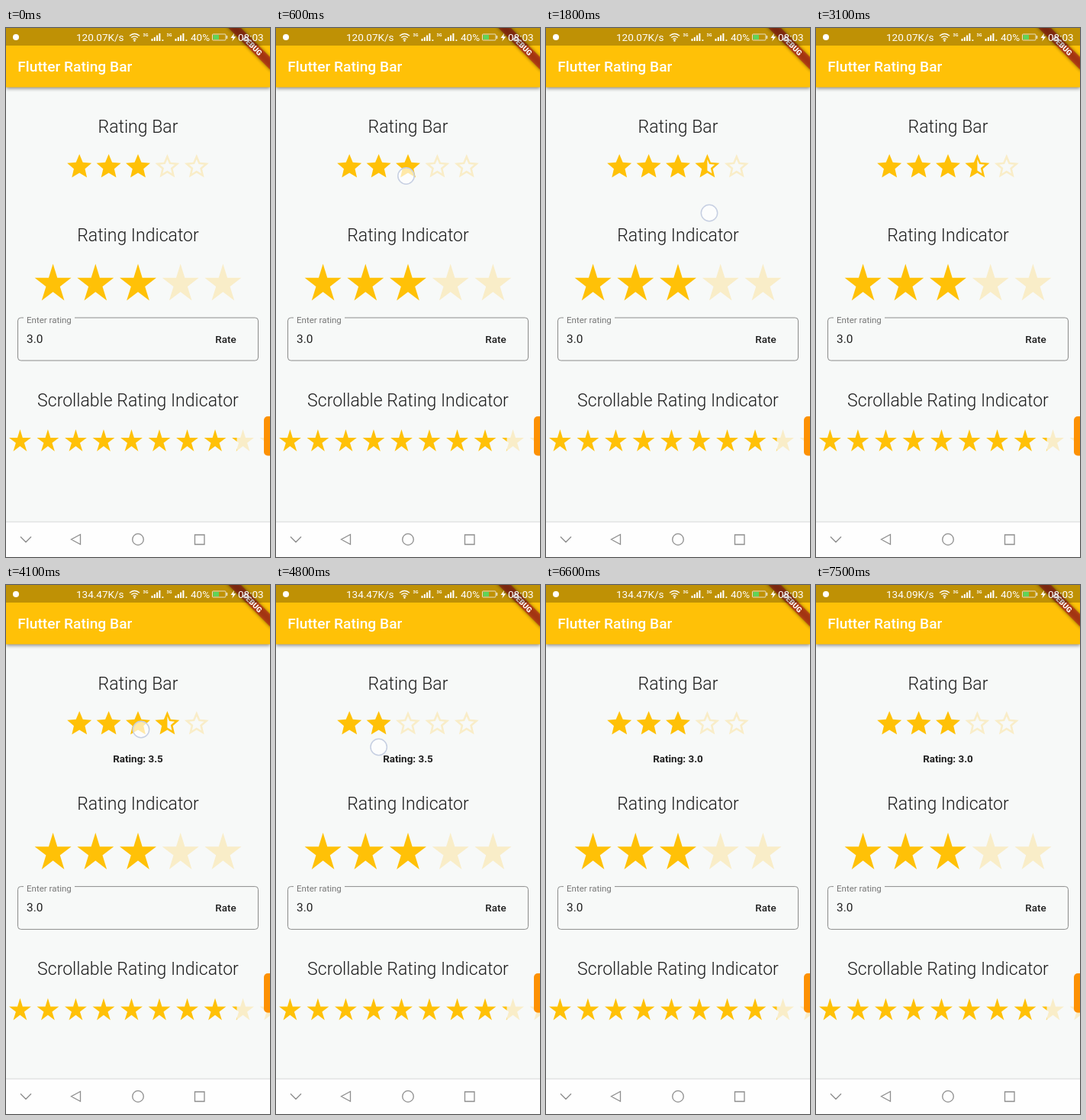
Write an HTML page that moves like this. It is 346 by 692 pixels and loops after 8 s.

```html
<!DOCTYPE html>
<html lang="en">
<head>
<meta charset="utf-8">
<title>Rating bar demo</title>
<style>
  html, body { margin: 0; width: 100%; height: 100%; overflow: hidden; background: #f7f9f8; }
  svg { display: block; width: 100vw; height: 100vh; font-family: Roboto, sans-serif; }
  .heading { font-size: 23.05px; font-weight: 300; text-anchor: middle; fill: #1c1c1c; }
  .status { font-size: 13.5px; fill: #fff; }
  .tiny { font-size: 5.5px; font-weight: 700; fill: #fff; }
  .amber { fill: #ffc107; }
  .pale { fill: #f9edc8; }
  .nav { fill: none; stroke: #8d8d8d; stroke-width: 1.3; }
</style>
</head>
<body>
<svg viewBox="0 0 346 692">
  <defs>
    <path id="full" d="M12 17.27L18.18 21l-1.64-7.03L22 9.24l-7.19-.61L12 2 9.19 8.63 2 9.24l5.46 4.73L5.82 21z"/>
    <path id="empty" fill-rule="evenodd" d="M22 9.24l-7.19-.62L12 2 9.19 8.63 2 9.24l5.46 4.73L5.82 21 12 17.27 18.18 21l-1.63-7.03zM12 15.4l-3.76 2.27 1-4.28-3.32-2.88 4.38-.38L12 6.1l1.71 4.04 4.38.38-3.32 2.88 1 4.28z"/>
    <path id="half" fill-rule="evenodd" d="M22 9.24l-7.19-.62L12 2 9.19 8.63 2 9.24l5.46 4.73L5.82 21 12 17.27 18.18 21l-1.63-7.03zM12 15.4V6.1l1.71 4.04 4.38.38-3.32 2.88 1 4.28z"/>
    <path id="sharp" d="M.5 0L.618 .382H1L.691 .618 .809 1 .5 .764 .191 1 .309 .618 0 .382H.382z"/>
    <clipPath id="fraction"><rect width=".22" height="1"/></clipPath>
    <filter id="shadow" x="-10%" y="-50%" width="120%" height="200%"><feGaussianBlur stdDeviation="2"/></filter>
    <g id="signal">
      <text class="tiny" x="0" y="11">3G</text>
      <path fill="#fff" d="M11 14h2v3h-2zM14.3 12h2v5h-2zM17.6 9.5h2v7.5h-2zM20.9 7h2v10h-2zM25 15.2h1.8V17H25z"/>
    </g>
  </defs>

  <rect width="346" height="692" fill="#f7f9f8"/>

  <text class="heading" x="173" y="136.5">Rating Bar</text>
  <g id="bar"></g>
  <text id="label" x="173" y="231.5" text-anchor="middle" font-size="13.45" font-weight="700" fill="#1f1f1f"></text>

  <g id="lower">
    <text class="heading" x="173" y="278.5">Rating Indicator</text>
    <g id="indicator"></g>
    <path fill="none" stroke="#8c8c8c" d="M23 379H19.5a4 4 0 0 0-4 4v48a4 4 0 0 0 4 4h307a4 4 0 0 0 4-4v-48a4 4 0 0 0-4-4H90"/>
    <text x="27" y="385.5" font-size="11.5" fill="#777">Enter rating</text>
    <text x="27" y="411.5" font-size="15.4" fill="#222">3.0</text>
    <text x="274.3" y="411.7" font-size="13.45" font-weight="500" fill="#1f1f1f">Rate</text>
    <text class="heading" x="173" y="495">Scrollable Rating Indicator</text>
    <g id="scroller"></g>
  </g>

  <rect x="338" y="508" width="16" height="51.5" rx="5" fill="#fd9103"/>

  <rect y="40" width="346" height="39.5" fill="#000" opacity=".4" filter="url(#shadow)"/>
  <rect class="amber" width="346" height="77.5"/>
  <text x="15.3" y="57" font-size="19.2" font-weight="500" fill="#fff">Flutter Rating Bar</text>

  <g transform="translate(346) rotate(45) scale(.961)">
    <rect x="-44" y="28" width="88" height="12" fill="#000" opacity=".5" filter="url(#shadow)"/>
    <rect x="-44" y="28" width="88" height="12" fill="#b71c1c" opacity=".63"/>
    <text y="37.6" text-anchor="middle" font-size="10.2" font-weight="900" fill="#fff">DEBUG</text>
  </g>

  <rect width="346" height="23" opacity=".25"/>
  <circle cx="13" cy="12" r="4" fill="#fff"/>
  <text id="speed" class="status" x="92" y="17"></text>
  <g fill="none" stroke="#fff" stroke-width="1.3">
    <path d="M162 10.2q6.5-5.4 13 0M164.2 12.6q4.3-3.6 8.6 0M166.4 14.8q2.1-1.8 4.2 0"/>
    <circle cx="168.5" cy="16.4" r=".6"/>
  </g>
  <use href="#signal" x="179.5"/>
  <use href="#signal" x="210.5"/>
  <text class="status" x="242" y="17">40%</text>
  <rect x="270.5" y="8" width="17.5" height="8" rx="1" fill="none" stroke="#e8e0c8"/>
  <path fill="#e8e0c8" d="M288.5 10h1.8v4h-1.8z"/>
  <path fill="#5fd35a" d="M271.5 9h7.5v6h-7.5z"/>
  <path fill="#fff" d="M299 7l-4.5 6h3l-1.2 4.5 5-6.2h-3.1z"/>
  <text class="status" x="304" y="17">08:03</text>

  <rect y="646" width="346" height="46" fill="#fefefe"/>
  <path d="M0 646h346" stroke="#d6d8d7"/>
  <path class="nav" d="M19 665.5l7 7 7-7M97.5 662.5v13L85.5 669zM247.5 663h12.500v12.500h-12.500z"/>
  <circle class="nav" cx="173" cy="669" r="7.3"/>

  <circle id="pointer" r="10.7" fill="#fff" fill-opacity=".65" stroke="#c6cfe2" stroke-width="1.5"/>
</svg>
<script>
const $ = id => document.getElementById(id);
const LOOP = 8000, STEP = 100;
const BAR_X = 77, BAR_Y = 161.9, ITEM = 38.4;

function addUse(parent, shape, x, y, scale, className) {
  const use = document.createElementNS('http://www.w3.org/2000/svg', 'use');
  use.setAttribute('href', '#' + shape);
  use.setAttribute('transform', `translate(${x} ${y}) scale(${scale})`);
  use.setAttribute('class', className);
  parent.append(use);
  return use;
}

function sharpRow(id, x, y, size, pitch, count, filled) {
  for (let i = 0; i < count; i++)
    addUse($(id), 'sharp', x + i * pitch, y, size, i < filled ? 'amber' : 'pale');
}
sharpRow('indicator', 37.6, 308.5, 48, 55.7, 5, 3);
sharpRow('scroller', 4, 525, 28.8, 36.52, 10, 8);
addUse($('scroller'), 'sharp', 4 + 8 * 36.52, 525, 28.8, 'amber')
  .setAttribute('clip-path', 'url(#fraction)');

const barStars = Array.from({ length: 5 }, (_, i) =>
  addUse($('bar'), 'empty', BAR_X + i * ITEM, BAR_Y, ITEM / 24, 'pale'));

// Each gesture is a list of [time, x, y]; the finger lifts after the last one.
const drags = [
  [[500, 177, 189], [700, 164, 198], [1000, 125, 221], [1100, 134, 227], [1400, 163, 234],
   [1800, 214, 242], [2000, 217, 243], [2300, 215, 243], [2700, 206, 243], [3000, 203, 243]],
  [[4100, 177, 189], [4300, 173, 192], [4900, 127, 216], [5000, 126, 216]]
];
const tap = [[5700, 177, 190], [6100, 177, 190]];

function fingerAt(time, gestures) {
  const path = gestures.find(g => time >= g[0][0] && time <= g.at(-1)[0]);
  if (!path) return null;
  const next = Math.max(1, path.findIndex(p => p[0] >= time));
  const [t0, x0, y0] = path[next - 1], [t1, x1, y1] = path[next];
  const k = (time - t0) / (t1 - t0);
  return { x: x0 + (x1 - x0) * k, y: y0 + (y1 - y0) * k };
}

// Value of the latest [time, value] entry already reached.
const latest = (time, entries) => entries.findLast(e => time >= e[0])[1];

function ratingAt(time) {
  const finger = fingerAt(time - STEP, drags);
  if (finger) return Math.ceil((finger.x - BAR_X) / ITEM * 2) / 2;
  return latest(time, [[0, 3], [3000, 3.5], [5000, 1.5], [6400, 3]]);
}

function draw(time) {
  const rating = ratingAt(time);
  barStars.forEach((star, i) => {
    const shape = rating >= i + 1 ? 'full' : rating > i ? 'half' : 'empty';
    star.setAttribute('href', '#' + shape);
    star.setAttribute('class', shape === 'empty' ? 'pale' : 'amber');
  });

  $('label').textContent = latest(time,
    [[0, ''], [3300, 'Rating: 3.5'], [5200, 'Rating: 1.5'], [6400, 'Rating: 3.0']]);
  $('lower').setAttribute('transform', `translate(0 ${time < 3300 ? 0 : 15.4})`);
  $('speed').textContent = latest(time,
    [[0, '120.07K/s'], [3300, '134.47K/s'], [7400, '134.09K/s']]);

  const finger = fingerAt(time, [...drags, tap]);
  $('pointer').style.display = finger ? '' : 'none';
  if (finger) $('pointer').setAttribute('transform', `translate(${finger.x} ${finger.y})`);
}

const start = performance.now();
function tick() {
  const time = (performance.now() - start) % LOOP;
  draw(Math.floor(time / STEP) * STEP);
  requestAnimationFrame(tick);
}
tick();
</script>
</body>
</html>
```
